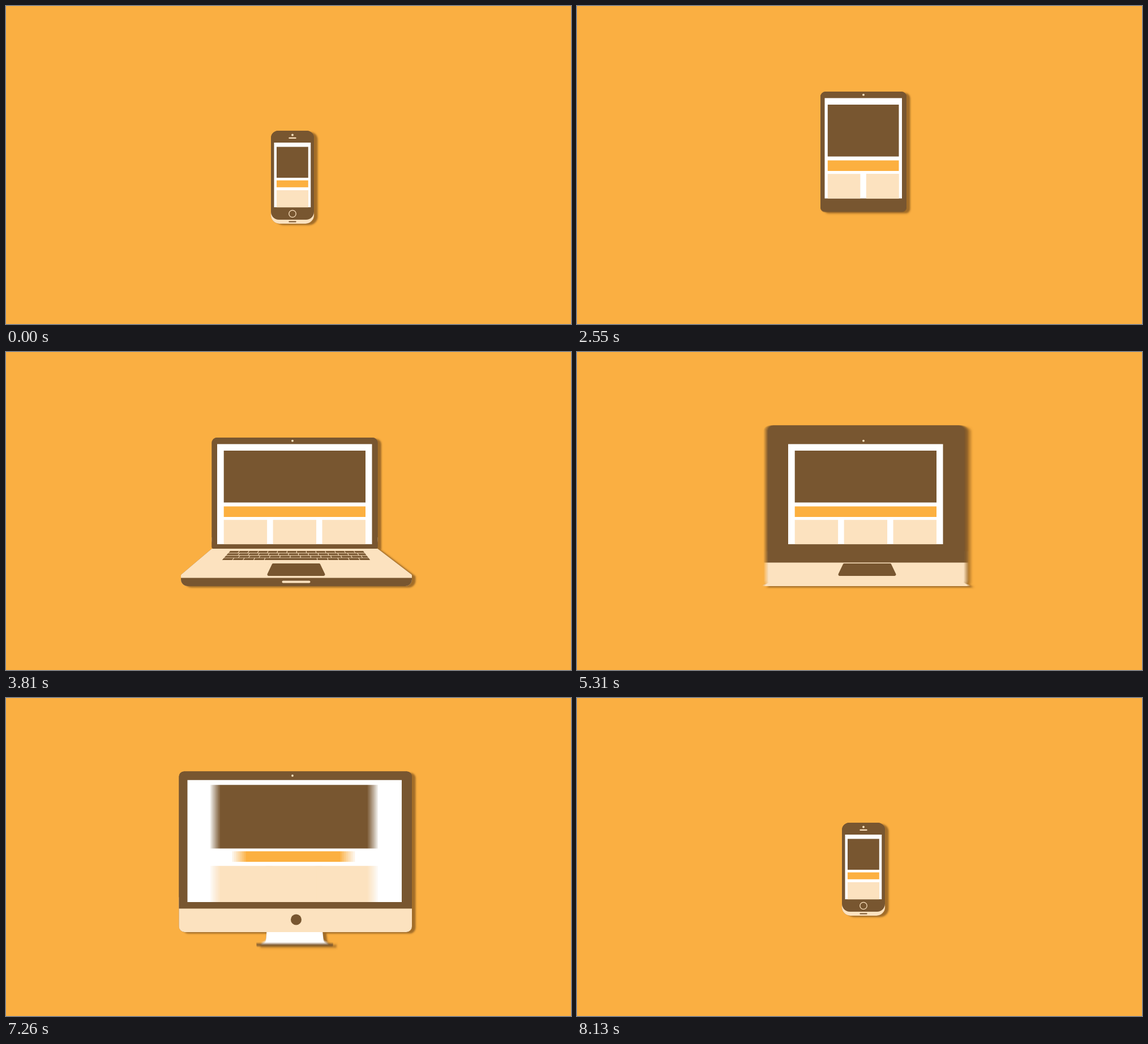
These frames come from a looping animation (998 by 561 pixels, 8.19 s). An HTML page with a canvas:

```html
<!DOCTYPE html>
<html lang="en">
<head>
<meta charset="utf-8">
<title>Responsive devices</title>
<style>
html, body { margin: 0; width: 100%; height: 100%; overflow: hidden; background: #faaf42; }
canvas { display: block; width: 100vw; height: 100vh; }
</style>
</head>
<body>
<canvas id="stage" width="998" height="561"></canvas>
<script>
const W = 998, H = 561, LOOP = 8190, SHUTTER = 15, SAMPLES = 8;
const BG = '#faaf42', BROWN = '#785630', CREAM = '#fce2bf', BAR = '#fcb040', WHITE = '#fff';

const out = document.getElementById('stage').getContext('2d');
const buffer = document.createElement('canvas');
buffer.width = W;
buffer.height = H;
const g = buffer.getContext('2d');

// Full pose of a device, worked out from its shell, screen and page layout
function device({ shell, screen, margin, pad, heroEnd, gap, barH, blocksTop, columns, ...extra }) {
  const [left, top, right, bottom] = shell, [sl, st, sr, sb] = screen;
  const heroL = sl + margin, heroR = sr - margin, gutter = 10.5;
  const colW = (heroR - heroL - gutter * (columns - 1)) / columns;
  const colX = i => heroL + Math.min(i, columns - 1) * (colW + gutter);
  const speaker = extra.speaker || 0;
  return {
    left, top, right, bottom, sl, st, sr, sb,
    heroL, heroR, barL: heroL, barR: heroR,
    heroTop: st + pad, heroEnd, barTop: heroEnd + gap, barEnd: heroEnd + gap + barH, blocksTop,
    colW, col0: colX(0), col1: colX(1), col2: colX(2),
    unit: right - left, cam: (top + st) / 2 - speaker * .45,
    topR: 9, botR: 0, chinR: 15, speaker, home: 0, port: 0,
    deckTop: 347, deckEnd: 347, flare: 0, gear: 0, pad: 0, knob: 0, stand: -45,
    ...extra
  };
}

const POSES = [
  device({ // phone
    shell: [468, 220, 544, 377], screen: [473.3, 241, 538.5, 355.3],
    margin: 4.7, pad: 7.5, heroEnd: 303, gap: 4.6, barH: 12.2, blocksTop: 325, columns: 1,
    topR: 13, botR: 14, chin: 384, speaker: 6.7, home: 6.2, port: 6.7
  }),
  device({ // tablet
    shell: [430, 151, 582, 377], screen: [437.3, 162.3, 574, 355.3],
    margin: 5.5, pad: 11.7, heroEnd: 265.5, gap: 6.9, barH: 18.6, blocksTop: 296.2, columns: 2,
    botR: 12, chin: 384, home: 5, port: 6.7
  }),
  device({ // laptop
    shell: [363.5, 151, 656.5, 347], screen: [373, 162.3, 646.7, 339.3],
    margin: 11.7, pad: 11.7, heroEnd: 265.5, gap: 6.9, barH: 18.6, blocksTop: 296.2, columns: 3,
    botR: 3, chin: 347, deckEnd: 413, flare: 54.5, gear: 1, pad: 11.7, padOn: 1
  }),
  device({ // desktop
    shell: [305.5, 129.5, 717, 371.5], screen: [320.3, 144.5, 699, 360],
    margin: 10.9, pad: 8.8, heroEnd: 265.5, gap: 4.9, barH: 18.6, blocksTop: 296.2, columns: 3,
    chin: 413, chinR: 10, deckTop: 413, deckEnd: 413, padOn: 1, knob: 1, stand: 0
  })
];

// Parts that move together; all others start with the change itself
const GROUPS = {
  wide: 'left right',
  tall: 'top bottom botR',
  screen: 'sl sr',
  rise: 'st cam topR knob',
  low: 'sb',
  hero: 'heroL heroR colW col0 col1 col2',
  bar: 'barL barR',
  rows: 'heroTop heroEnd barTop barEnd blocksTop unit',
  deck: 'deckTop deckEnd flare',
  trim: 'gear padOn',
  body: 'chin chinR home port speaker',
  stand: 'stand'
};

// Each group's start, with its own span where it differs
const sink = [7600, 530];
const CHANGES = [
  { at: 720, end: 1380, span: 330, tall: 852, screen: 850, rise: 870, hero: 893, bar: 893, rows: 1050 },
  { at: 2130, end: 3810, span: 517, wide: 2600, tall: 2300, screen: 2580, hero: 2750, bar: 2750, rows: 2600, deck: 3050, trim: 3290 },
  { at: 4560, end: 6330, span: 285, wide: 5167, tall: 4900, deck: 5100, screen: 5460, rise: 5460, low: 5460, stand: 5550, hero: 5750, rows: 5900, bar: 6045 },
  { at: 7140, end: 8130, span: 220, bar: 7147, hero: 7173, stand: [7140, 280], screen: [7280, 360], trim: 7300,
    wide: [7320, 400], body: [7400, 350], tall: sink, rise: sink, low: sink, rows: sink }
];

const ease = p => p < .5 ? 4 * p ** 3 : 1 - 4 * (1 - p) ** 3;

function stateAt(t) {
  const s = {};
  for (const group in GROUPS) {
    const progress = CHANGES.map(c => {
      const [from, span = c.span] = [c[group] || c.at].flat();
      return ease(Math.max(0, Math.min(1, (t - from) / span)));
    });
    for (const name of GROUPS[group].split(' ')) {
      const stops = POSES.map(pose => pose[name] || 0);
      s[name] = progress.reduce((v, p, i) => v + (stops[(i + 1) % 4] - v) * p, stops[0]);
    }
  }
  return s;
}

function fill(path, color) {
  g.fillStyle = color;
  g.fill(path);
}

function box(x0, y0, x1, y1, color) {
  g.fillStyle = color;
  g.fillRect(x0, y0, x1 - x0, y1 - y0);
}

function rounded(x0, y0, x1, y1, radii) {
  const p = new Path2D();
  p.roundRect(x0, y0, x1 - x0, y1 - y0, radii);
  return p;
}

function pill(x, y, half, h, color) {
  if (half > .25) fill(rounded(x - half, y - h / 2, x + half, y + h / 2, Math.min(half, h / 2)), color);
}

// Closed polygon with rounded corners: [x, y, radius]
function poly(points) {
  const p = new Path2D(), n = points.length;
  const [x0, y0] = points[0], [x1, y1] = points[n - 1];
  p.moveTo((x0 + x1) / 2, (y0 + y1) / 2);
  points.forEach(([x, y, r], i) => {
    const next = points[(i + 1) % n];
    p.arcTo(x, y, next[0], next[1], r || 0);
  });
  p.closePath();
  return p;
}

function scaled(x, y, k, draw) {
  if (k < .01) return;
  g.save();
  g.translate(x, y);
  g.scale(k, k);
  g.translate(-x, -y);
  draw();
  g.restore();
}

// Corners stay stretched with the shell until they are redrawn for the new width
function shellPath(s) {
  const stretch = (s.right - s.left) / s.unit;
  const top = { x: s.topR * stretch, y: s.topR }, low = { x: s.botR * stretch, y: s.botR };
  return rounded(s.left, s.top, s.right, s.bottom, [top, top, low, low]);
}

function deckPath(s) {
  const depth = Math.max(0, s.deckEnd - s.deckTop), mid = s.deckEnd - depth * .3, r = depth * .18;
  const x0 = s.left - s.flare, x1 = s.right + s.flare * 1.11;
  return poly([
    [s.left, s.deckTop], [s.right, s.deckTop],
    [x1, mid, 2], [x1, s.deckEnd, r], [x0, s.deckEnd, r], [x0, mid, 2]
  ]);
}

function standPaths(s) {
  const y = 447 + s.stand;
  return [
    poly([[462, y - 40], [557, y - 40], [561, y - 4, 5], [572, y + 2], [448, y + 2], [459, y - 4, 5]]),
    poly([[442, y + 1, 1], [578, y + 1, 1], [577, y + 5, 2], [443, y + 5, 2]])
  ];
}

function drawKeys() {
  const keys = 14, step = 4.2;
  const at = (f, y) => {
    const d = (y - 351) / (4 * step);
    return 396 - 15 * d + f * (236 + 28 * d);
  };
  for (let row = 0; row < 4; row++) {
    const y0 = 351 + row * step, y1 = y0 + step - .9;
    const isSpace = i => row === 3 && i > 4 && i < 9;
    let a = 0;
    for (let i = 1; i <= keys; i++) {
      if (isSpace(i)) continue;
      const b = i === keys ? 1 : (i + row % 3 * .2) / keys;
      fill(poly([[at(a, y0), y0], [at(b, y0) - 1.1, y0], [at(b, y1) - 1.1, y1], [at(a, y1), y1]]), BROWN);
      a = b;
    }
  }
}

// Trackpad that turns into a round knob
function drawPad(s) {
  const mix = (a, b) => a + (b - a) * s.knob;
  const x = 512.5, top = mix(373, 381.5), end = mix(395, 400.5);
  const a = mix(42, 9.5), b = mix(52.5, 9.5), r = mix(2.5, 9.5);
  scaled(x, 388, s.padOn, () =>
    fill(poly([[x - a, top, r], [x + a, top, r], [x + b, end, r], [x - b, end, r]]), BROWN));
}

function drawPage(s) {
  g.save();
  g.beginPath();
  g.rect(s.sl, s.st, s.sr - s.sl, s.sb - s.st);
  g.clip();
  box(s.sl, s.st, s.sr, s.sb, WHITE);
  box(s.heroL, s.heroTop, s.heroR, s.heroEnd, BROWN);
  box(s.barL, s.barTop, s.barR, s.barEnd, BAR);
  for (const x of [s.col0, s.col1, s.col2]) box(x, s.blocksTop, x + s.colW, s.sb, CREAM);
  // seam while the blocks still overlap
  if (s.col2 > s.col0 + 2 && s.col2 < s.col0 + s.colW) box(s.col2 - .5, s.blocksTop, s.col2 + .5, s.sb, BAR);
  g.restore();
}

function drawScene(t) {
  const s = stateAt(t), shell = shellPath(s);
  const chin = rounded(s.left, s.bottom - 20, s.right, Math.max(s.chin, s.bottom - 4), [0, 0, s.chinR, s.chinR]);
  const deck = s.deckEnd - s.deckTop > .5 ? deckPath(s) : new Path2D();
  const stand = s.stand > -44.9 ? standPaths(s) : [];
  box(0, 0, W, H, BG);

  // one common shadow under the whole device
  const outline = new Path2D();
  [shell, chin, deck, ...stand].forEach(p => outline.addPath(p));
  g.save();
  g.shadowColor = 'rgba(90,55,20,.55)';
  g.shadowBlur = 3;
  g.shadowOffsetX = 6.5;
  g.shadowOffsetY = 2.5;
  fill(outline, BROWN);
  g.restore();

  stand.forEach((p, i) => fill(p, i ? BROWN : WHITE));
  fill(chin, CREAM);
  pill(506, s.chin - 3.5, s.port, 2.2, BROWN);

  fill(deck, CREAM);
  g.save();
  g.clip(deck);
  box(0, s.deckEnd - 14.5 * s.gear, W, s.deckEnd, BROWN);
  g.restore();
  pill(512.5, s.deckEnd - 7.5, 25 * s.gear, 4, CREAM);
  scaled(513, 359, s.gear, drawKeys);

  fill(shell, BROWN);
  drawPad(s);
  drawPage(s);
  pill(506, s.cam, 1.9, 3.8, CREAM);
  pill(506, s.cam + 5.4, s.speaker, 2.3, CREAM);
  if (s.home > .2) {
    g.strokeStyle = CREAM;
    g.lineWidth = s.home * .21;
    g.beginPath();
    g.arc(506, 366.5, s.home, 0, 7);
    g.stroke();
  }
}

// Motion blur: average several moments while the shutter is open
function render(t) {
  const moving = CHANGES.some(c => t > c.at - SHUTTER && t < c.end + SHUTTER);
  const n = moving ? SAMPLES : 1;
  for (let i = 0; i < n; i++) {
    drawScene(t + ((i + .5) / n - .5) * SHUTTER);
    out.globalAlpha = 1 / (i + 1);
    out.drawImage(buffer, 0, 0);
  }
}

const begin = performance.now();
function tick() {
  render((performance.now() - begin) % LOOP);
  requestAnimationFrame(tick);
}
tick();
</script>
</body>
</html>
```
